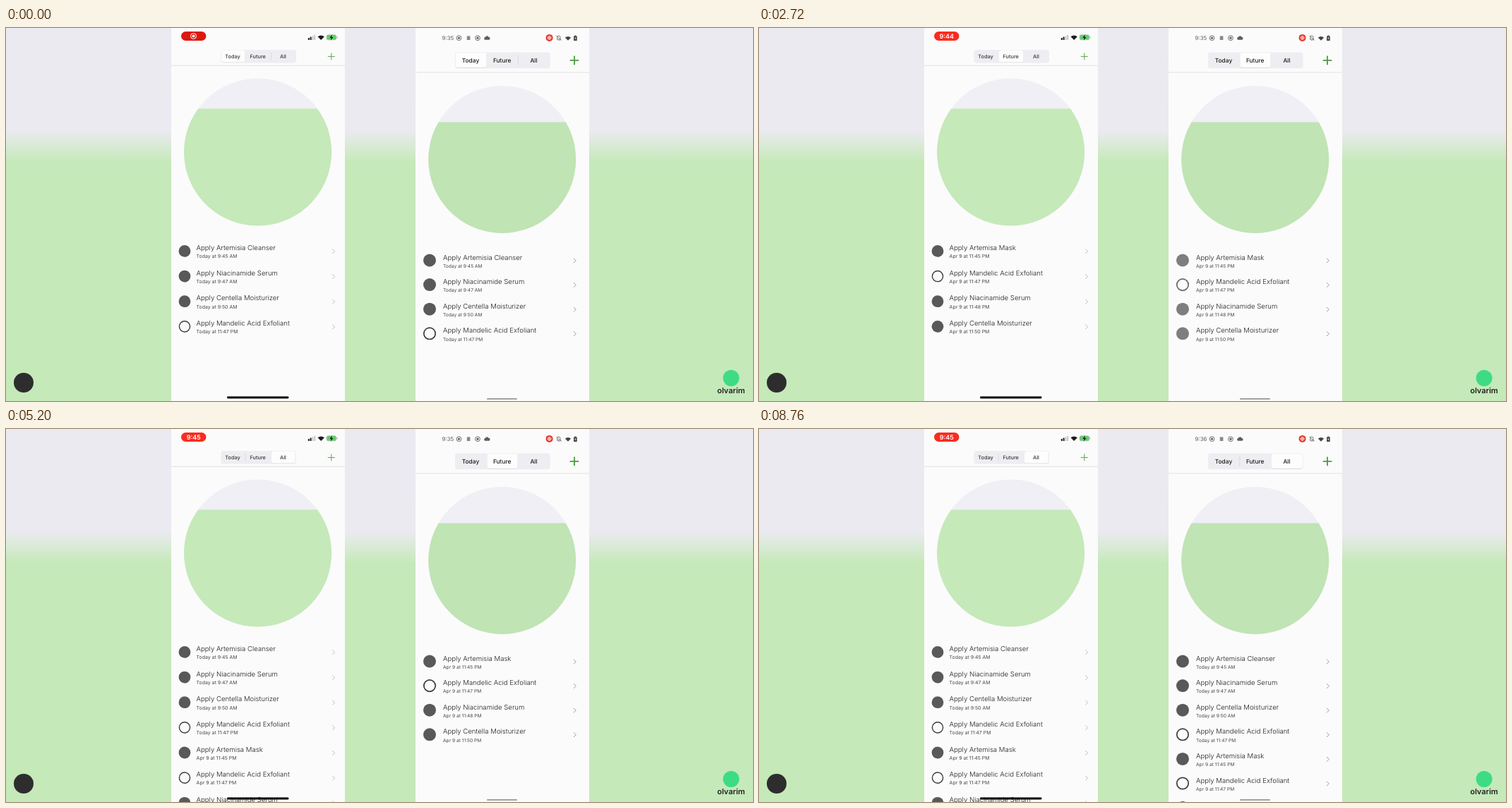
Recreate the animation shown at these times as an HTML page. Size 1058x529 px, loop 8.84 s.

```html
<!DOCTYPE html>
<html lang="en">
<head>
<meta charset="utf-8">
<title>Routine list on two phones</title>
<style>
html, body { margin: 0; width: 100%; height: 100%; overflow: hidden; background: #c5e9b9; }
svg { display: block; width: 100vw; height: 100vh; }
text { font-family: Inter, "Liberation Sans", sans-serif; text-rendering: geometricPrecision; }
</style>
</head>
<body>
<svg id="stage" viewBox="0 0 1058 529">
  <defs>
    <linearGradient id="bg" x1="0" y1="0" x2="0" y2="1">
      <stop offset="0" stop-color="#ebeaf1"/>
      <stop offset=".275" stop-color="#ebeaf0"/>
      <stop offset=".315" stop-color="#d9ead6"/>
      <stop offset=".36" stop-color="#c5e9b9"/>
      <stop offset="1" stop-color="#c5e9b9"/>
    </linearGradient>
  </defs>
  <rect width="1058" height="529" fill="url(#bg)"/>
  <circle cx="25" cy="503" r="14" fill="#2d2d2d"/>
  <circle cx="1027" cy="496.5" r="11.5" fill="#3ddc84"/>
  <text x="1027" y="518" font-size="11" font-weight="600" fill="#222" text-anchor="middle">olvarim</text>
</svg>
<script>
const LOOP = 8840;
const stage = document.getElementById('stage');

function add(parent, tag, attrs, text) {
  const el = document.createElementNS('http://www.w3.org/2000/svg', tag);
  for (const k in attrs) el.setAttribute(k, attrs[k]);
  if (text) el.textContent = text;
  parent.appendChild(el);
  return el;
}
const clamp = v => Math.max(0, Math.min(1, v));
const ease = v => v * v * (3 - 2 * v);

const cleanser = 'Artemisia Cleanser', serum = 'Niacinamide Serum';
const cream = 'Centella Moisturizer', acid = 'Mandelic Acid Exfoliant';
const today = [[cleanser, 'Today at 9:45 AM'], [serum, 'Today at 9:47 AM'],
  [cream, 'Today at 9:50 AM'], [acid, 'Today at 11:47 PM']];
const future = mask => [[mask, 'Apr 9 at 11:45 PM'], [acid, 'Apr 9 at 11:47 PM'],
  [serum, 'Apr 9 at 11:48 PM'], [cream, 'Apr 9 at 11:50 PM']];

const phones = [
  {
    x: 234, line: 53.2, mask: 'Artemisa Mask',
    disc: { x: 356.6, y: 176, r: 104.5, level: 114.4, fill: '#c5e9b9' },
    seg: { x: 304.5, y: 31, w: 106.5, h: 18.4, font: 7.35, base: 43, color: '#3a3a3a', rx: 3.5,
      tabs: [[305.2, 33.2, 321], [340, 34, 356.7], [376, 33.8, 392.5]], bars: [339, 375.3] },
    plus: { x: 460.8, y: 40.4, r: 5, w: 1, color: '#5aa54b' },
    row: { x: 253, y: 316.4, step: 35.65, text: 269.6, title: 9.6, sub: 6.95, titleY: -1.3, subY: 9.8,
      dot: 8.4, ring: 7.6, stroke: 1.4, chev: 462.3, chevColor: '#bcbcbe' },
    bar: { x: 313, y: 522.6, w: 87.5, h: 2.8, fill: '#000' },
    switches: [1640, 4840], fade: 200
  },
  {
    x: 580, line: 63, mask: 'Artemisia Mask',
    disc: { x: 702.7, y: 186.4, r: 104.5, level: 133.5, fill: '#c0e4b4' },
    seg: { x: 636, y: 34.5, w: 134.5, h: 22.5, font: 8.4, base: 49, color: '#1c1c1c', rx: 3,
      tabs: [[637, 43.5, 658], [681.5, 43, 702.7], [726, 43.8, 747.5]], bars: [680.8, 725.3] },
    plus: { x: 805, y: 45.9, r: 6.3, w: 1.8, color: '#4b9a40' },
    row: { x: 600, y: 329.5, step: 34.6, text: 619, title: 9.6, sub: 6.65, titleY: -1, subY: 10.3,
      dot: 9, ring: 8.2, stroke: 1.7, chev: 804, chevColor: '#9b9b9b' },
    bar: { x: 681, y: 525.2, w: 43, h: 1.6, fill: '#858585' },
    switches: [2490, 5280], fade: 300
  }
];

function drawDisc(g, d) {
  add(g, 'circle', { cx: d.x, cy: d.y, r: d.r, fill: '#f0eff5' });
  const dy = d.level - d.y, dx = Math.sqrt(d.r * d.r - dy * dy);
  add(g, 'path', { fill: d.fill,
    d: `M${d.x - dx} ${d.level}A${d.r} ${d.r} 0 1 0 ${d.x + dx} ${d.level}Z` });
}

function drawTabs(g, p) {
  const s = p.seg;
  add(g, 'rect', { x: s.x, y: s.y, width: s.w, height: s.h, rx: s.rx, fill: '#eeedf1' });
  p.dividers = s.bars.map(x => add(g, 'rect',
    { x: x - .3, y: s.y + 4, width: .7, height: s.h - 8, fill: '#d3d2d7' }));
  const box = { y: s.y + .8, height: s.h - 1.8, rx: s.rx - .5 };
  p.shadow = add(g, 'rect', { ...box, y: box.y + .7, fill: '#000', opacity: .1 });
  p.thumb = add(g, 'rect', { ...box, fill: '#fdfdfd' });
  ['Today', 'Future', 'All'].forEach((name, i) => add(g, 'text',
    { x: s.tabs[i][2], y: s.base, 'font-size': s.font, 'font-weight': 450,
      fill: s.color, 'text-anchor': 'middle' }, name));
}

function drawList(g, p, items) {
  const r = p.row, root = add(g, 'g', {});
  const words = add(root, 'g', {}), dots = add(root, 'g', {});
  items.forEach(([name, when], i) => {
    const y = r.y + r.step * i;
    if (name === acid) add(dots, 'circle', { cx: r.x, cy: y, r: r.ring, fill: 'none',
      stroke: '#3c3c3c', 'stroke-width': r.stroke });
    else add(dots, 'circle', { cx: r.x, cy: y, r: r.dot, fill: '#595959' });
    add(words, 'text', { x: r.text, y: y + r.titleY, 'font-size': r.title,
      'font-weight': 300, fill: '#1e1e1e' }, 'Apply ' + name);
    add(words, 'text', { x: r.text, y: y + r.subY, 'font-size': r.sub, fill: '#484848' }, when);
    add(words, 'path', { d: `M${r.chev} ${y - 2.9}l3.3 3.3l-3.3 3.3`, fill: 'none',
      stroke: r.chevColor, 'stroke-width': 1 });
  });
  return { root, words, dots };
}

function wifi(g, x, y, r, fill) {
  add(g, 'path', { d: `M${x} ${y}L${x - r} ${y - r}Q${x} ${y - r * 1.75} ${x + r} ${y - r}Z`, fill });
}

for (const p of phones) {
  const g = add(stage, 'g', {});
  add(g, 'rect', { x: p.x, y: 0, width: 246, height: 529, fill: '#fbfbfb' });
  add(g, 'rect', { x: p.x, y: p.line - .4, width: 246, height: .8, fill: '#dadadc' });
  drawDisc(g, p.disc);
  drawTabs(g, p);
  const q = p.plus;
  add(g, 'path', { d: `M${q.x - q.r} ${q.y}h${2 * q.r}M${q.x} ${q.y - q.r}v${2 * q.r}`,
    stroke: q.color, 'stroke-width': q.w });
  const later = future(p.mask);
  p.lists = [today, later, today.concat(later)].map(items => drawList(g, p, items));
  const b = p.bar;
  add(g, 'rect', { x: b.x, y: b.y, width: b.w, height: b.h, rx: b.h / 2, fill: b.fill });
}

// Left status bar
const pill = add(stage, 'rect', { x: 248, y: 5, width: 35.5, height: 13, rx: 6.5 });
const rec = add(stage, 'g', {});
add(rec, 'circle', { cx: 265.6, cy: 11.5, r: 4, fill: 'none', stroke: '#fff', 'stroke-width': 1 });
add(rec, 'circle', { cx: 265.6, cy: 11.5, r: 2, fill: '#fff' });
const clockL = add(stage, 'text', { x: 265.7, y: 14.8, 'font-size': 9, 'font-weight': 600,
  fill: '#fff', 'text-anchor': 'middle' });
for (let i = 0; i < 4; i++) add(stage, 'rect', { x: 427.8 + i * 2.8, y: 14 - i * 1.4, width: 2,
  height: 3 + i * 1.4, rx: .5, fill: i < 2 ? '#222' : '#c8c8c8' });
wifi(stage, 446.2, 17, 4.7, '#1c1c1c');
add(stage, 'rect', { x: 454.2, y: 9.8, width: 13.4, height: 7, rx: 2, fill: '#5fd06b',
  stroke: '#a7b5a8', 'stroke-width': .7 });
add(stage, 'rect', { x: 468.4, y: 12, width: 1, height: 2.6, rx: .5, fill: '#9aa69b' });
add(stage, 'path', { d: 'M462 9.3l-3.6 4.5h2.3l-.9 3.8l3.7-4.7h-2.4z', fill: '#111' });

// Right status bar
const grey = '#5e5e5e';
const clockR = add(stage, 'text', { x: 617.5, y: 16.9, 'font-size': 7.9, fill: grey });
for (const x of [641.5, 668]) {
  add(stage, 'circle', { cx: x, cy: 14.2, r: 3.4, fill: 'none', stroke: grey, 'stroke-width': .9 });
  add(stage, 'circle', { cx: x, cy: 14.2, r: 1.6, fill: grey });
}
add(stage, 'rect', { x: 652.8, y: 11.4, width: 4.6, height: 5.6, fill: '#888' });
add(stage, 'path', { d: 'M678.6 16.8a1.9 1.9 0 0 1 0-3.7a2.7 2.7 0 0 1 4.9-.3a2 2 0 0 1 .2 4z', fill: grey });
add(stage, 'circle', { cx: 769.6, cy: 13.9, r: 5, fill: '#e23a2e' });
add(stage, 'path', { d: 'M766.8 13.9h5.6M769.6 11.1v5.6', stroke: '#fff', 'stroke-width': .8 });
add(stage, 'circle', { cx: 769.6, cy: 13.9, r: 2.4, fill: 'none', stroke: '#fff', 'stroke-width': .7 });
add(stage, 'path', { d: 'M780.4 16.2h5.4l-.8-1.2v-2a2.1 2.1 0 0 0-4.2 0v2zM782.4 17.6h1.4M779.6 10.8l7 7',
  fill: 'none', stroke: grey, 'stroke-width': .8 });
wifi(stage, 796, 17.7, 4.2, '#444');
add(stage, 'path', { d: 'M804.1 11.4h1.3v-.9h2v.9h1.3v6.6h-4.6z', fill: '#444' });
add(stage, 'path', { d: 'M806.8 12.6l-1.5 2.4h1l-.3 1.8l1.5-2.4h-1z', fill: '#fbfbfb' });

function drawPhone(p, t) {
  const [a, b] = p.switches;
  const now = t < a ? 0 : t < b ? 1 : 2;
  const since = now ? t - p.switches[now - 1] : LOOP;
  const slide = ease(clamp(since / 180));
  const tabs = p.seg.tabs, to = tabs[now], from = tabs[Math.max(0, now - 1)];
  const mix = i => from[i] + (to[i] - from[i]) * slide;
  for (const el of [p.thumb, p.shadow]) {
    el.setAttribute('x', mix(0));
    el.setAttribute('width', mix(1));
  }
  p.dividers.forEach((el, i) => el.setAttribute('opacity', i === now || i === now - 1 ? 0 : 1));
  p.lists.forEach((list, i) => list.root.setAttribute('display', i === now ? 'inline' : 'none'));
  p.lists[now].words.setAttribute('opacity', clamp(since / (p.fade / 2)));
  p.lists[now].dots.setAttribute('opacity', clamp(since / p.fade));
}

function draw(t) {
  phones.forEach(p => drawPhone(p, t));
  const recording = t < 1900;
  pill.setAttribute('fill', recording ? '#dc1810' : '#f92b20');
  rec.setAttribute('display', recording ? 'inline' : 'none');
  clockL.textContent = recording ? '' : t < 3400 ? '9:44' : '9:45';
  clockR.textContent = t < 7000 ? '9:35' : '9:36';
}

function tick() {
  draw(performance.now() % LOOP);
  requestAnimationFrame(tick);
}
tick();
</script>
</body>
</html>
```
